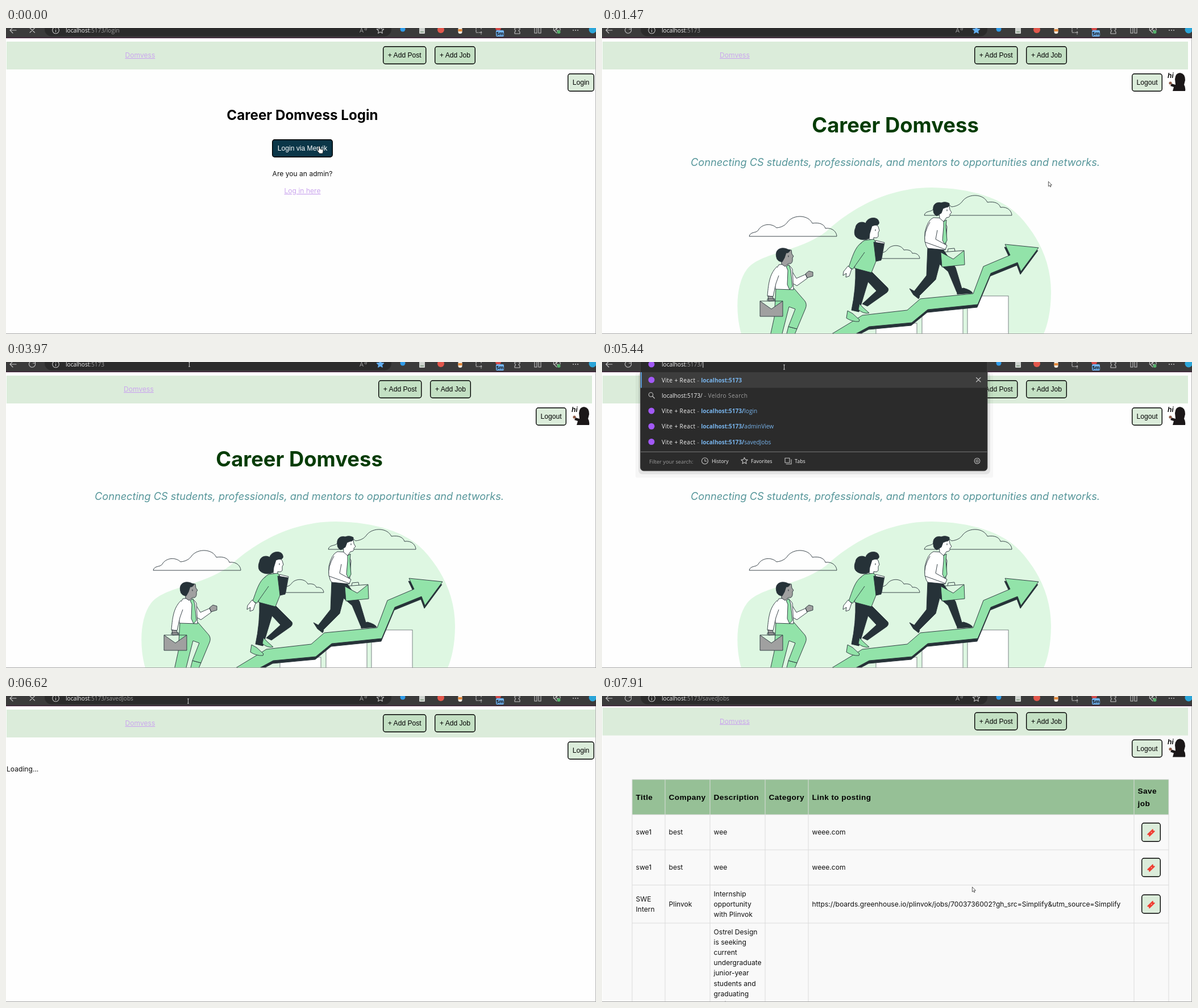
Write an HTML page that moves like this. It is 1038 px wide and 539 px high and loops after 8000 ms.

```html
<!DOCTYPE html>
<html lang="en">
<head>
<meta charset="utf-8">
<title>Job board walkthrough</title>
<style>
html, body { margin: 0; width: 100%; height: 100%; overflow: hidden; background: #fefefe; }
svg { display: block; width: 100%; height: 100%; }
text { white-space: pre; }
.page { font: 12.1px Inter, sans-serif; fill: #111; }
.btn { font: 12.1px "Liberation Sans", Arial, sans-serif; fill: #000; text-anchor: middle; }
.th { font: bold 13.68px "Liberation Sans", Arial, sans-serif; letter-spacing: .4px; fill: #000; }
.ui { font: 10.1px "Open Sans", "Noto Sans", sans-serif; fill: #f0f0f0; }
.site { letter-spacing: .4px; }
.small { font-size: 8.9px; }
.mid { text-anchor: middle; }
.link { fill: #cba6ee; text-decoration: underline; }
.h1 { font-weight: 700; font-size: 24.2px; fill: #000; }
.hero { font-weight: 700; font-size: 36.4px; fill: #053c05; }
.tag { font-style: italic; font-size: 18.15px; fill: #56969a; }
.dim { fill: #9c9c9c; }
.blue { fill: #78b4ec; }
.bold { font-weight: 700; }
.icon { fill: none; stroke: #c4c4c4; stroke-width: 1.1; stroke-linecap: round; stroke-linejoin: round; }
.ink { stroke: #263238; stroke-width: .9; stroke-linejoin: round; }
</style>
</head>
<body>
<svg id="stage" viewBox="0 0 1038 539" preserveAspectRatio="none"></svg>
<script>
const LOOP = 8000;
const GREEN = '#92e3a9', DARK = '#263238', GREY = '#a0a0a0', PANEL = '#2b2b2b', MINT = '#dbecda';
const stage = document.getElementById('stage');
const ruler = document.createElement('canvas').getContext('2d');

const rect = (x, y, w, h, fill, extra = '') =>
  `<rect x="${x}" y="${y}" width="${w}" height="${h}" fill="${fill}" ${extra}/>`;
const dot = (x, y, r, fill) => `<circle cx="${x}" cy="${y}" r="${r}" fill="${fill}"/>`;
const text = (x, y, s, cls, extra = '') => `<text x="${x}" y="${y}" class="${cls}" ${extra}>${s}</text>`;
const span = (s, cls) => `<tspan class="${cls}">${s}</tspan>`;
const icon = (d, extra = '') => `<path class="icon" d="${d}" ${extra}/>`;
const ink = (fill, d) => `<path class="ink" fill="${fill}" d="${d}"/>`;
const move = (x, y, s) => `<g transform="translate(${x} ${y})">${s}</g>`;
const ring = (x, y, r) => `M${x - r},${y} a${r},${r} 0 1 0 ${2 * r},0 a${r},${r} 0 1 0 ${-2 * r},0`;
const star = (x, y, r, fill) => {
  const points = Array.from({ length: 10 }, (_, i) => {
    const a = i * Math.PI / 5, q = i % 2 ? r * .48 : r;
    return `${(x + q * Math.sin(a)).toFixed(1)},${(y - q * Math.cos(a)).toFixed(1)}`;
  });
  return icon(`M${points.join('L')}Z`, fill ? `style="fill:${fill};stroke:${fill}"` : '');
};
const button = (x, y, w, label, fill, color = '#000') =>
  rect(x + .7, y + .7, w - 1.4, 30.6, fill, 'rx="4" stroke="#000" stroke-width="1.4"') +
  text(x + w / 2, y + 20, label, 'btn', `style="fill:${color}"`);

// ---------- illustration ----------
const CLOUD = 'M259,367 C261,358 271,362 275,356 C281,345 298,343 307,352 C317,351 323,347 327,341 C338,328 363,329 370,344 C383,342 391,346 393,353 C406,351 413,360 413,367Z';
const cloud = (x, y, k = 1) =>
  `<path class="ink" fill="none" vector-effect="non-scaling-stroke" transform="translate(${x} ${y}) scale(${k})" d="${CLOUD}"/>`;
const ARROW = 'M404,539 L447,513 L458,506 L537,497 L560,477 L653,468 L671,420 L718,400 L709,381 L768,387 L737,429 L731,413 L684,432 L661,487 L573,496 L545,519 L470,526 L446,539Z';

const climber = [
  ['#fff', 'M331,423 L342,441 L358,434 L361,441 L343,454 L334,449Z'],
  [GREY, 'M358,433 L364,428 L371,430 L371,437 L361,440Z'],
  [GREEN, 'M328,526 L343,530 L338,542 L324,542Z'],
  [GREEN, 'M306,458 L338,459 L357,481 Q361,487 358,494 L343,530 L328,526 L340,495 L329,491 L316,542 L296,542 L303,510Z'],
  ['#fff', 'M311,417 Q302,428 305,460 L337,461 L335,425 Q330,416 322,416Z'],
  ['#fff', 'M308,420 C296,432 293,446 291,472 L301,473 L306,450 L311,436'],
  [GREY, 'M292,472 L300,473 L303,480 L293,481Z'],
  [GREEN, 'M324,420 L329,417 L332,426 L335,455 L330,461 L326,452 L327,427Z'],
  [GREY, 'M315,405 L316,416 L322,420 L328,415 L332,415 Q336,413 335,405 L337,402 L334,398 L333,391 L320,392Z'],
  [DARK, 'M307,404 C303,388 318,385 327,390 L331,391 Q329,397 324,396 L321,405 L317,412 Q308,411 307,404Z'],
  ['none', 'M291,481 V477 H304 V481'],
  [GREY, 'M278,481 H318 V508 H278Z L298,495 L318,481']
];
const reader = [
  [DARK, 'M446,422 L475,430 L502,457 Q506,461 501,466 L467,490 L458,486 L483,463 L468,447 L452,500 L439,497 Q447,460 446,422Z'],
  [GREEN, 'M432,498 L430,511 Q441,518 452,517 L453,514 L441,503Z'],
  [GREEN, 'M453,486 L451,496 Q460,504 470,502 L460,493Z'],
  [DARK, 'M446,352 C447,342 458,340 464,344 C466,333 485,331 487,341 C489,346 483,349 479,348 L476,364 C472,374 455,376 447,368 C443,364 444,356 446,352Z'],
  ['#fff', 'M475,349 Q484,345 486,350 L488,357 L486,360 L486,367 Q484,371 478,369 L478,375 L470,372 L471,362Z'],
  [GREEN, 'M462,374 L478,372 L484,381 L484,406 L474,431 L444,423 Q448,405 449,392 Q451,380 462,374Z'],
  ['#fff', 'M481,374 L497,378 L492,406 L484,408Z'],
  [DARK, 'M478,377 L496,380 L491,409 L482,411Z'],
  [GREEN, 'M457,378 C445,385 440,405 434,421 L441,425 C450,412 455,405 462,395'],
  ['#fff', 'M433,419 L425,429 L424,436 L430,432 L429,439 L435,437 L439,425Z']
];
const leader = [
  [DARK, 'M573,386 L600,390 L622,422 L634,462 L624,465 L609,429 L594,416 L587,443 L559,471 L549,464 L571,436Z'],
  [DARK, 'M541,459 L552,465 Q562,470 557,477 L548,470Z'],
  [DARK, 'M624,462 L636,458 Q650,462 652,467 L625,469Z'],
  ['#fff', 'M583,334 Q573,338 568,360 Q567,382 573,388 L604,391 L607,350 L600,335Z'],
  ['#fff', 'M593,320 L594,335 L601,341 L606,334 Q613,334 612,328 L615,325 L612,320 L611,313 L598,312Z'],
  [GREEN, 'M601,341 L606,338 L605,350 L607,374 L603,381 L599,374 L601,350Z'],
  ['#fff', 'M577,342 Q566,360 568,377 L604,390 L607,383 L587,372 L590,356'],
  [DARK, 'M583,322 C581,309 590,306 597,308 Q604,305 611,309 Q612,316 605,316 L600,318 L597,326 L589,331 Q583,328 583,322Z'],
  ['none', 'M608,394 L609,389 L620,388 L621,393'],
  [GREEN, 'M596,395 L637,392 L638,417 L598,421Z L618,407 L637,392']
];
const figure = parts => parts.map(p => ink(...p)).join('');
const bar = (x, y) => rect(x, y, 72, 90, '#fff', 'stroke="#5d6669" stroke-width=".8"');

const ILLUSTRATION =
  '<path fill="#def7e2" d="M245,539 C234,500 236,450 255,425 C280,394 345,396 395,358 C445,312 510,281 580,281 C650,282 705,300 735,332 C770,370 790,415 790,465 C790,495 785,520 777,539Z"/>' +
  cloud(0, 0) + cloud(308, -37) + cloud(290.5, 167.5, .65) +
  bar(482, 520) + bar(563, 490) + bar(643, 472) +
  `<g transform="translate(-1 5)">${ink(DARK, ARROW)}</g>` + ink(GREEN, ARROW) +
  figure(climber) + figure(reader) + figure(leader) +
  icon('M328,401 v2 M481,355 v2 M607,320 v2', `style="stroke:${DARK}"`);

// ---------- page ----------
const avatar = x => move(x, 0,
  text(0, 88, 'hi', 'page', 'style="font-style:italic;font-weight:600;fill:#000"') +
  '<path fill="#1b1718" d="M13,90 Q14,79 22,79 Q31,80 31,92 L29,100 Q32,104 31,111 H9 L11,104 L5,102 L7,98 L14,100Z"/>' +
  dot(5, 97, 2.6, '#8d5b48'));

function header(wide, user) {
  const dx = wide ? 8 : 0;
  let s = rect(1, 24, wide ? 1037 : 1030, 49, MINT) +
    text(wide ? 209.5 : 207, 52, 'Domvess', 'page link') +
    button(655 + dx, 32, 76.5, '+ Add Post', '#c3e0c3') +
    button(746 + dx, 32, 72, '+ Add Job', '#c3e0c3');
  const shift = wide ? 7 : 0;
  if (user === 'guest') s += button(981 + shift, 80, 47, 'Login', MINT);
  else s += button(932 + shift, 80, 54, 'Logout', MINT);
  if (user === 'member') s += avatar(995 + shift);
  return s;
}

const loginPage = () => header(true, 'guest') +
  text(521.5, 162, 'Career Domvess Login', 'page h1 mid') +
  button(468, 196, 107, 'Login via Mervik', '#0b3648', '#fff') +
  text(521.5, 260.5, 'Are you an admin?', 'page mid') +
  text(521.5, 291, 'Log in here', 'page link mid');

const homePage = t => header(false, t < 930 ? 'guest' : t < 1210 ? 'loading' : 'member') +
  text(516, 184, 'Career Domvess', 'page hero mid') +
  text(516, 242.5, 'Connecting CS students, professionals, and mentors to opportunities and networks.',
    'page tag mid', `opacity="${t < 1210 ? 0 : t < 1340 ? .35 : t < 1470 ? .7 : 1}"`) +
  ILLUSTRATION;

const loadingPage = t => header(true, t < 6770 ? 'guest' : 'member') +
  text(1, 133, 'Loading...', 'page');

const COLS = [53, 111, 190, 287, 363, 936, 997];
const ROWS = [147, 209, 271, 333, 400, 640];
const cell = (col, middle, lines, cls = 'page', step = 18.2) => lines.map((line, i) =>
  text(COLS[col] + 6.5, middle + 4.4 + (i - (lines.length - 1) / 2) * step, line, cls)).join('');
const ticket = y => rect(949.7, y - 16.3, 32.6, 32.6, MINT, 'rx="4" stroke="#000" stroke-width="1.4"') +
  `<g transform="translate(966 ${y + 1}) rotate(-45)">${rect(-7, -3, 14, 6, '#ee3f33', 'rx="1"')}` +
  `${dot(-7, 0, 1.3, MINT)}${dot(7, 0, 1.3, MINT)}${dot(1, 0, .9, '#ffc0b8')}</g>`;

function jobsPage(t) {
  const table = rect(53, 147, 944, 62, '#96c096') +
    COLS.map(x => rect(x - .5, 147, 1, 400, '#dcdcdc')).join('') +
    ROWS.map(y => rect(53, y - .5, 944, 1, '#dcdcdc')).join('') +
    ['Title', 'Company', 'Description', 'Category', 'Link to posting']
      .map((name, i) => cell(i, 178.5, [name], 'th')).join('') +
    cell(5, 178.5, ['Save', 'job'], 'th', 21.5) +
    [240, 302].map(y => ['swe1', 'best', 'wee', '', 'weee.com']
      .map((s, i) => cell(i, y, [s])).join('') + ticket(y)).join('') +
    cell(0, 366.5, ['SWE', 'Intern']) + cell(1, 366.5, ['Plinvok']) +
    cell(2, 366.5, ['Internship', 'opportunity', 'with Plinvok']) +
    cell(4, 366.5, ['https://boards.greenhouse.io/plinvok/jobs/7003736002?gh_src=Simplify&amp;utm_source=Simplify']) +
    ticket(366.5) +
    cell(2, 478.8, ['Ostrel Design', 'is seeking', 'current', 'undergraduate', 'junior-year', 'students and', 'graduating', 'project']);
  const scroll = t < 7910 ? 0 : -3.5;
  return rect(1, 20, 1036, 519, '#f9f9f9') + move(0, scroll, header(false, 'member') + move(0, 3.5, table));
}

// ---------- browser chrome ----------
const viteIcon = y => dot(87, y, 5.5, '#a259f7');
const typedAt = t => t < 5590 ? '' : t < 5720 ? 's' : t < 5850 ? 'sa' : 'sav';

function panel(t) {
  const typed = typedAt(t);
  const site = span('Vite + React', 'site') + span(' - ', 'site dim');
  const address = (path, rest) => site + span('localhost:5173' + path, 'blue bold') + span(rest, 'blue');
  const search = s => `localhost:5173/${s}` + span(' - Veldro Search', 'site dim');
  const rows = typed
    ? [address('/' + typed, 'savedJobs'.slice(typed.length)), search(typed),
       span('Vite + React - ', 'site dim') + span('http://localhost:5173/', 'blue')]
    : [address('', ''), search(''), address('/', 'login'), address('/', 'adminView'), address('/', 'savedJobs')];
  const end = 22 + rows.length * 27.25, bottom = end + 33.5, foot = end + 16;
  return rect(59, 18, 629, bottom - 6, '#000', 'opacity=".03" rx="3"') +
    rect(64, 18, 619, bottom - 12, '#000', 'opacity=".08" rx="7"') +
    rect(67.5, -10, 610.5, bottom + 10, PANEL, 'rx="6" stroke="#4a4a4a" stroke-width=".8"') +
    rect(68, 18, 609.5, 27.5, '#3d3d3d') + rect(68, 18, 2, 27.5, '#5a9bd6') +
    rows.map((row, i) => (i === 1 ? icon(ring(86, 57.5, 3.7) + 'M89,60.5 l3.5,3.5') : viteIcon(31.5 + i * 27.25)) +
      text(105, 35.7 + i * 27.25, row, 'ui')).join('') +
    icon('M658.5,27.5 l7.5,7.5 m0,-7.5 l-7.5,7.5') +
    rect(68, end - .5, 609.5, 1, '#7b7b7b') +
    text(83, foot + 4.3, 'Filter your search:', 'ui small dim', 'style="font-size:9.3px"') +
    icon(`${ring(181, foot, 5.5)} M181,${foot - 3} v3.5 h3`) + text(193, foot + 3.4, 'History', 'ui small') +
    star(250.5, foot, 6) + text(262, foot + 3.4, 'Favorites', 'ui small') +
    icon(`M322,${foot - 5} h8 v8 h-8z M324,${foot + 5.5} h9 v-8`) + text(339, foot + 3.4, 'Tabs', 'ui small') +
    icon(ring(660, foot, 2) + ring(660, foot, 4.8), 'stroke-dasharray="2.6 .9"');
}

function addressText(t) {
  const suggesting = t >= 5320 && t < 6230;
  const typed = typedAt(t);
  const path = t < 800 ? '/login' : t < 5320 ? '' : t < 5590 ? '/' : '/savedJobs';
  ruler.font = '10.1px "Open Sans", "Noto Sans", sans-serif';
  const xOf = s => 105 + ruler.measureText(s).width;
  const select = (from, to) => rect(xOf(from), -2, xOf(to) - xOf(from), 13, '#2f6fb3');
  let s = '';
  if (t >= 4120 && t < 4770) s += select('', 'localhost:5173');
  if (suggesting && typed) s += select('localhost:5173/' + typed, 'localhost:5173/savedJobs');
  s += text(105, 7.7, 'localhost' + span(':5173' + path, 'dim'), 'ui');
  if (t >= 4770 && t < 5590) s += rect(xOf('localhost:5173' + path) + .5, -1, 1, 11, '#ddd');
  return s;
}

const EXTENSIONS =
  dot(698, 2, 4.5, '#2f9be8') + rect(727, -3, 10, 13, '#cfd3cf', 'rx="1"') + rect(729, 6, 6, 1.5, '#7f9a80') +
  dot(765, 3, 6, '#e2574c') + rect(795.5, -2, 7, 12, '#f2e8dc', 'rx="3"') + rect(795.5, 2, 7, 4, '#e58a3c') +
  icon('M827,-1 v9 h9 M831,-1 h5 v4 M834,8 h4 M836,6 v5', 'stroke-dasharray="3 1.6"') +
  dot(866, 0, 5, '#d34b4b') + rect(862, 4, 14, 11, '#72b5f5', 'rx="2"') +
  text(869, 13, '5m', 'ui mid bold', 'style="font-size:8.5px;fill:#111"') +
  icon('M895,0 h3 q1,-4 3,0 h3 v3 q-4,1 0,4 v3 h-9 v-3 q3,-2 0,-4z') +
  icon('M930,-2 h4 v11 h-4z M937,-2 h4 v11 h-4z') +
  icon('M969,9 l-5,-5 q-2,-4 2,-5 l3,2 3,-2 q4,1 3,5 M963,4 h3 l2,-3 2,5 1,-2 h2') + dot(972.5, 7, 3, '#55b26b') +
  [998, 1002, 1006].map(x => dot(x, 4, .9, '#d0d0d0')).join('') + dot(1032, 3, 6.5, '#2ba5d8');

function chrome(t) {
  const open = t >= 5320 && t < 6490, suggesting = t >= 5320 && t < 6230;
  const busy = t < 1210 || (t >= 6230 && t < 6930);
  const focused = t >= 4120 && t < 5320;
  let s = rect(0, 0, 1038, 16, '#3b3b3b') + rect(0, 16, 1038, 2, '#3f2c3b') + rect(1, 18, 1036, 2, '#fbf4f9') +
    icon('M7,4 h11 M12,-1 l-5,5 5,5') +
    icon(busy ? 'M42,0 l8.5,8 m0,-8 l-8.5,8' : 'M51.5,3 a5.5,5.5 0 1 1 -2,-3.5 M51.5,-2 v4 h-4') + EXTENSIONS;
  s += open ? panel(t) :
    rect(68, -14, 610, 28.5, PANEL, `rx="12" ${focused ? 'stroke="#5a9bd6" stroke-width="1.2"' : ''}`);
  s += suggesting ? viteIcon(4) : icon(ring(87.5, 4, 5.8) + 'M87.5,3.5 v3.5 M87.5,1 v.2');
  if (!suggesting) s += text(622, 8, 'A', 'ui dim', 'style="font-size:11px"') + icon('M631,-1 q2,2 0,4 M633,-2 q3,3 0,6', 'opacity=".6"') +
    star(658.5, 4, 6.5, t >= 1210 && t < 5320 ? '#63aef0' : '');
  if (t >= 6230 && t < 6490) s += icon('M593,-1 h4 v4 h-4z M599,-1 h4 v4 h-4z M593,5 h4 v4 h-4z M599,5 h4 v4 h-4z');
  return s + addressText(t);
}

// ---------- pointer ----------
const POINTERS = {
  hand: '<path d="M-2,-5 q1.5,-1.5 2.5,0 v4 l4,1 q2,.5 1.5,3 l-1,4 h-5.5 l-4,-5 q0,-2 2.5,0z" fill="#fff" stroke="#222" stroke-width=".8"/>',
  arrow: '<path d="M.4,.4 V9 L2.4,7.2 L3.7,10 L5,9.4 L3.8,6.6 H6.4Z" fill="#fff" stroke="#333" stroke-width=".8"/>',
  beam: '<path d="M-1.5,-4 h3 M0,-4 v8 M-1.5,4 h3" fill="none" stroke="#c8c8c8" stroke-width="1"/>'
};
const TRACK = [
  [0, 552, 214, 'hand'], [800, 552, 210, 'arrow'], [930, 572, 216, 'arrow'], [1060, 630, 234, 'arrow'],
  [1210, 710, 256, 'arrow'], [1340, 765, 267, 'arrow'], [1470, 785, 270, 'arrow'],
  [1860, 800, 246, 'arrow'], [1990, 840, 200, 'arrow'], [2120, 900, 150, 'arrow'], [2250, 965, 105, 'arrow'],
  [2380, 1022, 76, 'arrow'], [2510, 1020, 100, 'arrow'], [2640, 999, 121, 'arrow'],
  [2770, 910, 62, 'arrow'], [2890, 838, 74, 'arrow'], [3060, 865, 86, 'arrow'],
  [3320, 610, 42, 'arrow'], [3440, 338.5, 3, 'beam'], [3690, 322.5, 5, 'beam'], [3840, 317.5, 6, 'beam'],
  [3970, 322.5, 4, 'beam'], [4250, 320.5, 9, 'beam'],
  [7080, 405, 265, 'arrow'], [7260, 384, 335, 'arrow'], [7390, 367, 379, 'arrow'], [7650, 651, 336, 'arrow']
];
function pointer(t) {
  const [, x, y, kind] = TRACK.findLast(key => key[0] <= t);
  return move(x, y, POINTERS[kind]);
}

function scene(t) {
  const page = t < 800 ? loginPage() : t < 6490 ? homePage(t) : t < 6930 ? loadingPage(t) : jobsPage(t);
  return rect(0, 0, 1038, 539, '#fefefe') + page +
    rect(1037, 18, 1, 521, '#b4b4b4') + rect(0, 538, 1038, 1, '#a6a6a6') + chrome(t) + pointer(t);
}

let shown = '';
function frame(now) {
  const markup = scene(now % LOOP);
  if (markup !== shown) stage.innerHTML = shown = markup;
  requestAnimationFrame(frame);
}
frame(0);
</script>
</body>
</html>
```
